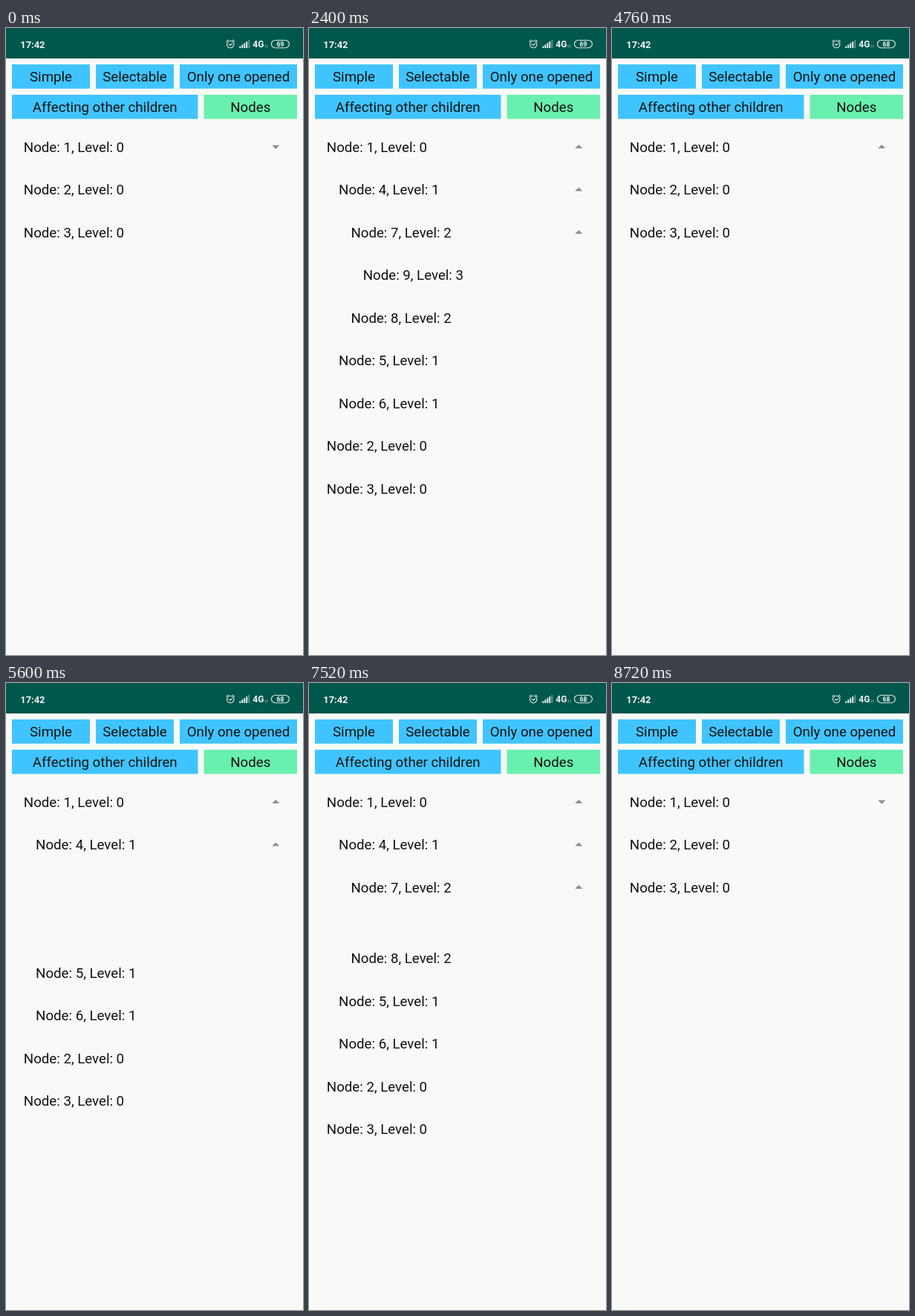
Write an HTML page that moves like this. It is 400x844 px and loops after 9.08 s.

```html
<!DOCTYPE html>
<html lang="en">
<head>
<meta charset="utf-8">
<title>Expandable node list</title>
<style>
  html, body { margin: 0; width: 100%; height: 100%; overflow: hidden; background: #f8faf8; }
  svg { display: block; width: 400px; height: 844px; }
  text { font-family: Roboto, Arial, sans-serif; font-size: 18.7px; fill: #101211; }
  .status text { font-weight: 700; fill: #eef5f3; }
  .mid { text-anchor: middle; }
</style>
</head>
<body>
<svg viewBox="0 0 400 844">
  <rect width="400" height="844" fill="#f8faf8"/>
  <g class="status">
    <rect width="400" height="41" fill="#00574b"/>
    <text x="19.3" y="26.5" style="font-size:12.9px">17:42</text>
    <g fill="none" stroke="#dfebe8" stroke-width="1.1" stroke-linecap="round">
      <circle cx="302.2" cy="22" r="4.7"/>
      <path d="M296.9 18.2l2.3-2M307.5 18.2l-2.3-2M300.2 21.6l1.8 1.6 2.5-2.2"/>
      <rect x="357.4" y="16.5" width="24" height="10.2" rx="5.1"/>
    </g>
    <g id="signal" fill="#eef5f3"></g>
    <text x="332.3" y="26.3" style="font-size:12px">4G</text>
    <path d="M349.2 22.5v4M351.8 22.5v4" stroke="#7fa9a2" stroke-width=".9"/>
    <text id="battery" class="mid" x="369.4" y="24.8" style="font-size:8.6px">69</text>
  </g>
  <g id="buttons"></g>
  <g id="rows"></g>
</svg>
<script>
const LOOP = 9080, STEP = 40;
const MOVE = 250, FADE = 120;
const PITCH = 57.5, INDENT = 16.3;
const BATTERY_DROP = 3720;

const children = { 0: [1, 2, 3], 1: [4, 5, 6], 4: [7, 8], 7: [9] };
// [time, tapped node]; each tap toggles the node
const taps = [
  [280, 1], [1040, 4], [1750, 7], [3960, 1], [4760, 1],
  [5350, 4], [5900, 7], [6840, 7], [7370, 7], [8320, 1]
];
const buttons = [
  ["Simple", 8, 49, 105], ["Selectable", 121, 49, 105], ["Only one opened", 234, 49, 158],
  ["Affecting other children", 8, 89.8, 250.5], ["Nodes", 266.5, 89.8, 125.5]
];

const byId = id => document.getElementById(id);

function add(parent, tag, attrs, text) {
  const el = document.createElementNS("http://www.w3.org/2000/svg", tag);
  for (const key in attrs) el.setAttribute(key, attrs[key]);
  if (text) el.textContent = text;
  return parent.appendChild(el);
}

for (let i = 0; i < 5; i++) {
  const h = 2.5 + i * 2.1;
  add(byId("signal"), "rect", {
    x: 314.3 + i * 3, y: 27 - h, width: 1.9, height: h, opacity: i < 4 ? 1 : 0.4
  });
}

for (const [label, x, y, width] of buttons) {
  const fill = label === "Nodes" ? "#69f0ae" : "#40c4ff";
  add(byId("buttons"), "rect", { x, y, width, height: 32.6, fill });
  add(byId("buttons"), "text", { x: x + width / 2, y: y + 23.2, class: "mid" }, label);
}

const rows = {};
function build(parent, level) {
  for (const id of children[parent] || []) {
    const g = add(byId("rows"), "g", {});
    add(g, "text", { x: 23.8 + level * INDENT, y: 166.9 }, `Node: ${id}, Level: ${level}`);
    const arrow = children[id] && add(g, "path", { fill: "#8e908f" });
    rows[id] = { g, arrow };
    build(id, level + 1);
  }
}
build(0, 0);

function flatten(open, parent = 0) {
  return children[parent].flatMap(id => open.has(id) ? [id, ...flatten(open, id)] : [id]);
}

function close(open, id) {
  open.delete(id);
  for (const child of children[id] || []) close(open, child);
}

const open = new Set();
let shown = flatten(open);
const stages = [{ start: -1000, from: shown, to: shown, open: new Set() }];
for (const [start, id] of taps) {
  open.has(id) ? close(open, id) : open.add(id);
  const next = flatten(open);
  stages.push({ start, from: shown, to: next, open: new Set(open) });
  shown = next;
}

const ease = p => (1 - Math.cos(Math.PI * Math.min(1, Math.max(0, p)))) / 2;

function draw(t) {
  const { start, from, to, open } = stages.filter(s => s.start <= t).pop();
  const elapsed = t - start;
  const delay = to.length < from.length ? FADE : 0;
  const moved = ease((elapsed - delay) / MOVE);

  for (const id in rows) {
    const { g, arrow } = rows[id];
    const a = from.indexOf(+id), b = to.indexOf(+id);
    let slot = a, alpha = 1;
    if (a < 0 && b < 0) alpha = 0;
    else if (a < 0) {
      slot = b;
      alpha = ease((elapsed - MOVE) / FADE);
    } else if (b < 0) alpha = 1 - ease(elapsed / FADE);
    else slot = a + (b - a) * moved;

    g.setAttribute("transform", `translate(0 ${slot * PITCH})`);
    g.setAttribute("opacity", alpha);
    if (arrow) arrow.setAttribute("d", open.has(+id)
      ? "M358.2 162.1h10.2l-5.1-5.1z"
      : "M358.2 157.8h10.2l-5.1 5.1z");
  }
  byId("battery").textContent = t < BATTERY_DROP ? "69" : "68";
}

const origin = performance.now();
function tick() {
  const t = (performance.now() - origin) % LOOP;
  draw(Math.floor(t / STEP) * STEP);
  requestAnimationFrame(tick);
}
tick();
</script>
</body>
</html>
```
